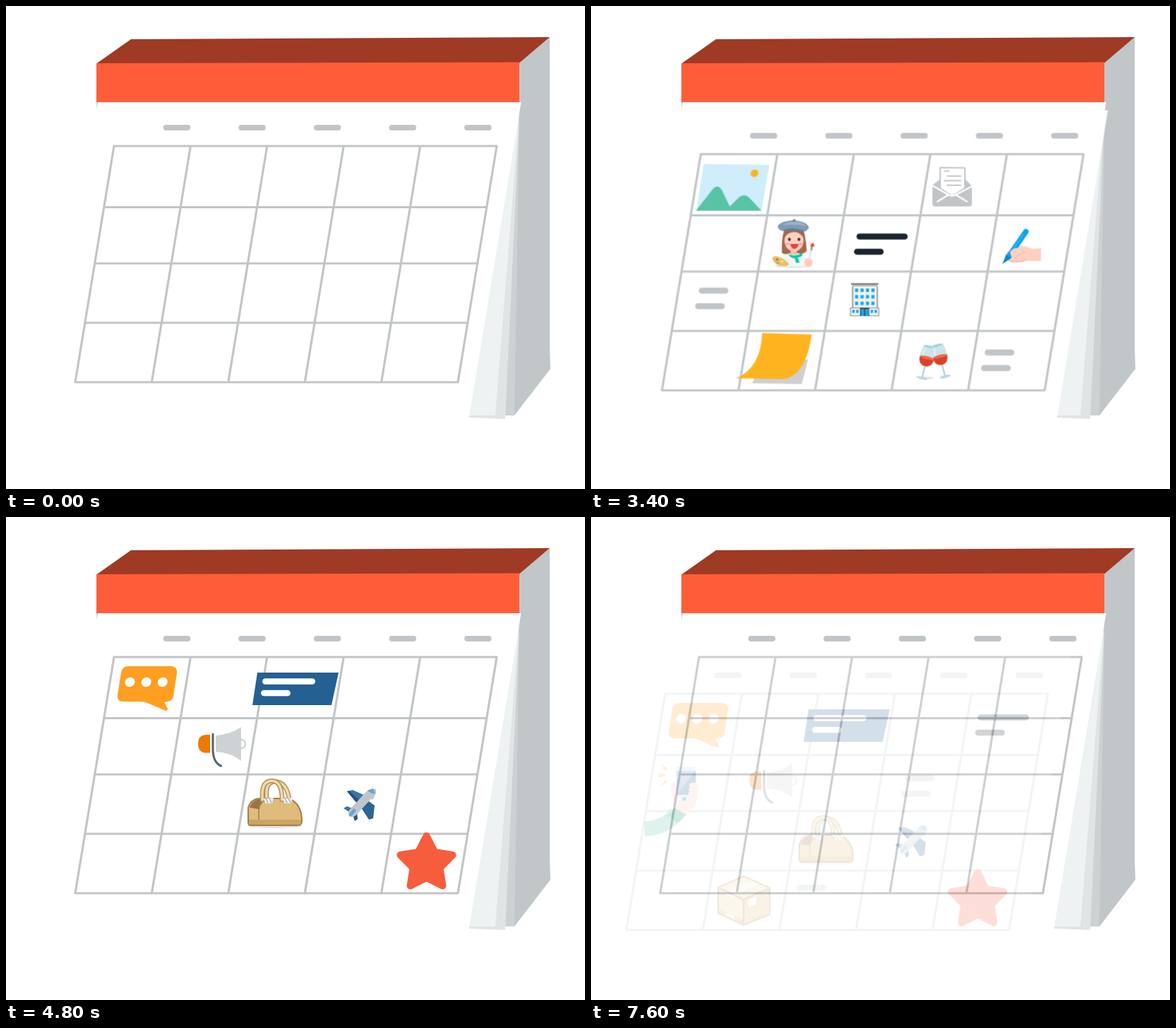
Recreate the animation shown at these times as an HTML page with a canvas. Size 820 by 683 pixels, loop 7.7 s.

```html
<!DOCTYPE html>
<html lang="en">
<head>
<meta charset="utf-8">
<title>Calendar</title>
<style>
html, body { margin: 0; width: 100%; height: 100%; overflow: hidden; background: #fff; }
canvas { display: block; width: 820px; height: 683px; }
</style>
</head>
<body>
<canvas id="stage" width="820" height="683"></canvas>
<script>
const W = 820, H = 683, LOOP = 7700, TICK = 100;
const GREY = '#c1c5c8', INK = '#1b2430', SKIN = '#ffd0c2';
const stage = document.getElementById('stage').getContext('2d');
const layer = document.createElement('canvas');
layer.width = W;
layer.height = H;
const sheetCtx = layer.getContext('2d');
let g = stage;

function fill(d, color) {
  g.fillStyle = color;
  g.fill(new Path2D(d));
}

function line(d, color, width, cap = 'round') {
  g.strokeStyle = color;
  g.lineWidth = width;
  g.lineCap = cap;
  g.lineJoin = 'round';
  g.stroke(new Path2D(d));
}

function shape(d, color, edge, width) {
  fill(d, color);
  line(d, edge, width);
}

function oval(x, y, rx, ry, color, turn = 0) {
  g.fillStyle = color;
  g.beginPath();
  g.ellipse(x, y, rx, ry, turn, 0, Math.PI * 2);
  g.fill();
}

function box(x, y, w, h, color) {
  g.fillStyle = color;
  g.fillRect(x, y, w, h);
}

function bar(x1, x2, y, color, width = 8.6) {
  const r = width / 2;
  line(`M${x1 + r} ${y}H${x2 - r}`, color, width);
}

const greyBars = (x, y) => () => {
  bar(x + 5, x + 47, y, GREY);
  bar(x, x + 42, y + 22, GREY);
};

const inkBars = (x, y) => () => {
  bar(x + 3.5, x + 76, y, INK);
  bar(x, x + 42, y + 21.5, INK);
};

function picture() {
  fill('M157 212L250 213L239 278L147 277Z', '#cfedfa');
  fill('M146 278L168 250Q176 238 183 249L194 272L206 260Q215 252 223 261L239 278Z', '#58c4a5');
  oval(229, 225, 5.6, 5.2, '#ffb41f', -0.5);
}

function envelope() {
  fill('M491 234L481 242V268Q481 272 485 272H533Q537 272 537 268V243L528 234Z', GREY);
  shape('M492 217L527 217.5V246L513 255Q509 257 505 255L492 246Z', '#fff', GREY, 2);
  line('M498 222H504M502 229H521M498 235.5H521M502 242H521', GREY, 2);
  line('M482 243L504 255.5Q509 258 514 255.5L536 244M488 265L503 256M530 265L515 256', '#fff', 2.4);
}

function artist() {
  oval(284, 356, 26, 2.5, '#dcdfe1');
  fill('M271 306Q267 318 268 338Q275 341 282 338H290Q297 341 303 335Q302 316 298 304Z', '#a5674e');
  fill('M264 354Q266 341 279 338H291Q304 342 306 357H266Z', '#f4f5f6');
  box(280, 332, 9, 8, '#f5b9a5');
  oval(285, 320, 13.5, 15.5, SKIN);
  fill('M271 318Q274 309 285 308Q294 308 299 318V305H271Z', '#a5674e');
  oval(276, 325, 2.8, 2, '#ffaaa0');
  oval(294.5, 325, 2.8, 2, '#ffaaa0');
  oval(278.5, 318.5, 2, 2.3, '#3c3230');
  oval(292, 318.5, 2, 2.3, '#3c3230');
  fill('M279.5 325H291.5Q290 332 285.5 332Q281 332 279.5 325Z', '#e6403a');
  fill('M262 301Q263 293 284 291.5Q304 293 306 302Q304 307 298 308Q284 303 271 307Q263 306 262 301Z', '#7f9bb5');
  fill('M267 299Q276 293 292 294Q300 296 302 300Q284 296 267 299Z', '#9db3c6');
  line('M272 306Q284 302 297 307', '#5f7d99', 2.6);
  line('M284 292L286 291', '#5f7d99', 2.5);
  fill('M277 339Q286 344 296 338L297 341Q293 345 290 344L293 351L288 352L286 345Q279 345 277 339Z', '#04cda0');
  fill('M254 345Q256 341 263 343Q272 346 278 353Q276 358 267 356Q256 354 254 345Z', '#e7c260');
  oval(261, 347, 2, 1.4, '#e6573a');
  oval(268, 350, 2, 1.4, '#f2e3b0');
  oval(262, 352, 1.8, 1.2, '#78a6b8');
  fill('M300 349Q302 344 308 345Q313 348 310 356Q303 359 300 355Z', '#ffcabd');
  line('M306 347L310 331', '#dfe6e9', 2.8);
  line('M309.6 333L310.2 330', '#8aa0ac', 2.8);
  fill('M308 327L312 322.5L314 328L309.5 330Z', '#e8522f');
}

function building() {
  box(368, 384, 35, 32, '#eef1f2');
  line('M368 385V415M403 385V415', '#85898c', 1.5, 'butt');
  box(366, 380.5, 38.5, 2.2, '#707477');
  box(367.5, 383, 35.5, 2, '#b5babd');
  for (let r = 0; r < 3; r++)
    for (let c = 0; c < 4; c++) box(371.5 + c * 7.7, 388 + r * 9.3, 4.4, 4.8, '#17a6e8');
  shape('M365 415.5H405V426.5H365Z', '#f8f9fa', '#85898c', 1.2);
  box(378.5, 415, 13, 12, '#40484e');
  box(380, 417, 4.5, 10, '#17a6e8');
  box(386, 417, 4.5, 10, '#17a6e8');
  for (const x of [367.5, 373, 393.5, 399]) box(x, 418, 3.5, 4.6, '#17a6e8');
}

function writing() {
  fill('M584 343Q585 333 597 331Q603 326 611 328L624 332L635 331V349L614 349Q597 354 588 349Q582 348 584 343Z', SKIN);
  line('M590 349Q604 352 614 347', '#f5b9a8', 1.2);
  line('M613.5 307.5L589 343', '#0aa3ea', 7.5);
  fill('M585.5 340L592.5 345L580 353.5Z', '#0b86c9');
  line('M610 311L593 336', '#35b8f2', 1.6);
  fill('M591 336Q597 329 607 331L613 337Q604 338 598 345Q592 346 591 336Z', SKIN);
  line('M613 337Q604 338 598 345', '#f5b9a8', 1.2);
}

function note() {
  fill('M232 508L226 522L296 523L305 488Z', '#cdcfd1');
  fill('M240 451L310 453Q302 511 270 516L203 515Q238 500 240 451Z', '#ffb41f');
}

function glass(x, y, turn) {
  g.save();
  g.translate(x, y);
  g.rotate(turn);
  line('M0 12V30', '#a9cbd6', 2);
  oval(0, 30.5, 8, 2, '#b8d7e0');
  fill('M-8.5 -15H8.5Q13 4 8 10Q0 18 -8 10Q-13 4 -8.5 -15Z', '#cbe4ec');
  fill('M-10.3 1H10.3Q10 8 7 10.5Q0 16 -7 10.5Q-10 8 -10.3 1Z', '#dc4127');
  oval(0, 1, 10.3, 2.2, '#ef6a45');
  oval(0, -15, 8.5, 1.8, '#a9cfdb');
  line('M-5 -11Q-7 -4 -6 -2', '#eef8fa', 1.6);
  g.restore();
}

function toast() {
  oval(472, 514.5, 11, 2, '#e3e6e8');
  glass(473.5, 485, 0.24);
  glass(491.5, 483, -0.25);
}

function star() {
  const pts = [];
  for (let i = 0; i < 10; i++) {
    const a = i * Math.PI / 5 - Math.PI / 2, r = i % 2 ? 20 : 39;
    pts.push(`${595.5 + r * Math.cos(a)} ${490 + r * Math.sin(a)}`);
  }
  shape(`M${pts.join('L')}Z`, '#f65d3c', '#f65d3c', 10);
}

function bubble() {
  fill('M173 211H233Q243 211 242 221L237 253Q236 260 229 261L224 262L229 271Q229 275 224 273L198 262Q194 261 190 261H166Q157 261 158 252L163 220Q165 211 173 211Z', '#ff9f22');
  for (let i = 0; i < 3; i++) oval(175.5 + i * 23.2, 233.5, 7.2, 6.6, '#fff', -0.7);
}

function card() {
  fill('M356 220H471L461 266H349Z', '#256093');
  bar(363, 438, 232.5, '#fff');
  bar(361, 403, 249, '#fff');
}

function phone() {
  fill('M147 296.5L157 304L153 307.5Z', '#ffb526');
  fill('M144 310L156 313.5L144 316.5Z', '#ffb526');
  fill('M147 328L153 319.5L157 322.5Z', '#ffb526');
  line('M123.5 389Q154 388 169 366', '#5cc4a8', 21, 'butt');
  fill('M168 357Q162 366 155 371Q164 374 170 381Q179 375 184 366Z', '#009d70');
  fill('M161 329Q160 323 165 324L170 338L191 326Q200 323 200 330L196 354Q193 366 180 368L165 358Q166 350 162 342Z', '#ffc9bb');
  fill('M171 301H194Q197 301 197 304V348Q197 351 194 351H171Q168 351 168 348V304Q168 301 171 301Z', '#c2dee6');
  box(169, 307, 27, 34, '#6f9dc1');
  fill('M196 307V341H169Z', '#235f94');
  oval(180, 346.5, 2.7, 2.7, '#235f94');
  for (let i = 0; i < 4; i++) bar(187 - i * 0.6, 200.5 - i * 0.9, 327.5 + i * 6.2, '#ffc9bb', 6.8);
  fill('M161 329Q161 323 166 324Q169 327 169 350L165 354Z', '#ffc9bb');
  line('M190 330.5H198M189 336.8H198M188 343H197', '#f3aa9b', 0.8);
  fill('M165 352H193Q192 365 180 367L167 358Z', '#ffc9bb');
}

function megaphone() {
  fill('M289 308H282Q272 309 272 320.5Q272 332 281 333.5H289Z', '#f07800');
  line('M339 321A5 6 0 1 1 329 321A5 6 0 1 1 339 321Z', '#cfd2d4', 2.4);
  fill('M297 309Q319 307 333 297V345Q318 333 297 332Z', '#cfd2d4');
  line('M293 307V328Q293 347 304.5 352', '#56636d', 3);
}

function bag() {
  oval(381, 437, 39, 3, '#e3e3e3');
  const handle = (d) => { line(d, '#b1905a', 6.5); line(d, '#f0d9a6', 3.5); };
  handle('M369 400V387Q370 374 382 374Q398 376 401 399');
  shape('M343 432V411Q347 398 361 398H401Q419 406 419 430Q419 436 413 436H347Q343 436 343 432Z', '#dfbc7c', '#a67f45', 2);
  fill('M345 411Q349 399 361 399L366 400Q358 405 358 413Z', '#9a7544');
  line('M358 435V414Q359 403 369 400', '#a67f45', 1.6);
  fill('M344 428H418V433Q417 435 413 435H347Q344 435 344 432Z', '#cba565');
  handle('M363 400V390Q364 373 377 373Q391 374 391 400');
  for (const x of [364, 391]) {
    fill(`M${x} 398L${x + 4} 405H${x + 13}L${x + 15} 397Z`, '#eff0ef');
    line(`M${x + 4} 398L${x + 7} 404M${x + 9} 398L${x + 12} 404`, '#a5adb1', 1.4);
  }
}

function plane() {
  fill('M483 388L491 386L509 394L499 407Z', '#3d75a5');
  fill('M483 388L486 387L503 403L499 407Z', '#1f5588');
  fill('M514 402L522 408L520 426L514 428L503 411Z', '#2c6595');
  fill('M478 412L483 409L493 413L489 419Z', '#3d75a5');
  fill('M491 421L497 417L498 427L494 430Z', '#1f5588');
  line('M491 418L514 393', '#c0c5c9', 12);
  fill('M508 391Q516 383 524 385Q525 392 519 400Z', '#c0c5c9');
  fill('M512 387Q517 384 520 384L523 391Q517 392 512 387Z', '#64a8d2');
  line('M488 421L493 415', '#64a8d2', 5);
}

function parcel() {
  fill('M264 456L301 472.5L264 489L228 472Z', '#f0d9a9');
  fill('M228 472L264 489V525L228 508Z', '#efd6a2');
  fill('M301 472.5V510L264 525V489Z', '#dfbc7e');
  fill('M228 501L264 517V525L228 508Z', '#dcba7d');
  fill('M240 477L277 461L288 466L251 483V488L240 483Z', '#faf1da');
  fill('M239 507L251 512V519.5L239 513.5Z', '#faf1da');
  fill('M271 489L281.5 484.5V496L271 500.5Z', '#fff');
  line('M264 456L301 472.5V510L264 525L228 508V472ZM228 472L264 489L301 472.5M264 489V525', '#ad8852', 2);
}

const shortBar = () => bar(338.5, 381, 472, GREY);

// [tick of appearance, drawing]
const first = [
  [5, picture], [6, artist], [7, envelope], [8, inkBars(370, 314.5)],
  [9, greyBars(145, 391)], [10, building], [11, note], [12, greyBars(550, 478.5)],
  [13, toast], [14, writing]
];
const second = [
  [43, star], [44, bubble], [45, card], [46, megaphone], [47, bag], [48, plane],
  [49, parcel], [50, shortBar], [51, greyBars(487, 317.5)], [52, phone], [53, inkBars(592, 231.5)]
];

function block() {
  box(0, 0, W, H, '#fff');
  fill('M770 44V485L771 513L720 579L700 560L727 140V80Z', '#c1c6c8');
  fill('M727 165L720 579H700Z', '#cdd1d3');
  fill('M727 160L707 584L656 582V579Z', '#e0e4e5');
  fill('M727 150L693 579H656Z', '#eef2f3');
  fill('M128 136H131L129 151Z', GREY);
  fill('M177 47L770 44L727 80.5L128 81.5Z', '#9f3a25');
  fill('M128 81L727 79.5V136H128Z', '#ff5d3a');
}

function sheet(items, tick) {
  fill('M130 136H729.5L656 580H56Z', '#fff');
  for (let i = 0; i < 5; i++) bar(222.7 + i * 106.6, 261.2 + i * 106.6, 172, GREY, 8);
  const skew = y => 153 - (y - 198) * 55 / 334;
  let d = '';
  for (const y of [198, 284.5, 364, 448, 532]) d += `M${skew(y)} ${y}h542`;
  for (let i = 0; i < 6; i++) d += `M${153 + i * 108.4} 198l-55 334`;
  line(d, GREY, 3.2);
  for (const [start, paint] of items) if (tick >= start) paint();
}

function fall(items, tick, dx, dy, alpha) {
  g = sheetCtx;
  g.clearRect(0, 0, W, H);
  sheet(items, tick);
  g = stage;
  g.save();
  g.globalAlpha = alpha;
  g.translate(dx, dy);
  g.drawImage(layer, 0, 0);
  g.restore();
}

function draw(tick) {
  block();
  if (tick < 34) sheet(first, tick);
  else if (tick >= 38 && tick < 73) sheet(second, tick);
  else {
    sheet([], tick);
    if (tick < 38) {
      const n = tick - 34;
      fall(first, tick, 2.5 - 8.5 * n, 11.5 + 12.9 * n, 1 - 0.25 * n);
    } else {
      const n = tick - 73;
      fall(second, tick, -4.7 - 14.4 * n, 12 + 13.3 * n, 0.8 - 0.2 * n);
    }
  }
}

function frame(now) {
  draw(Math.floor(now % LOOP / TICK));
  requestAnimationFrame(frame);
}
draw(0);
requestAnimationFrame(frame);
</script>
</body>
</html>
```
